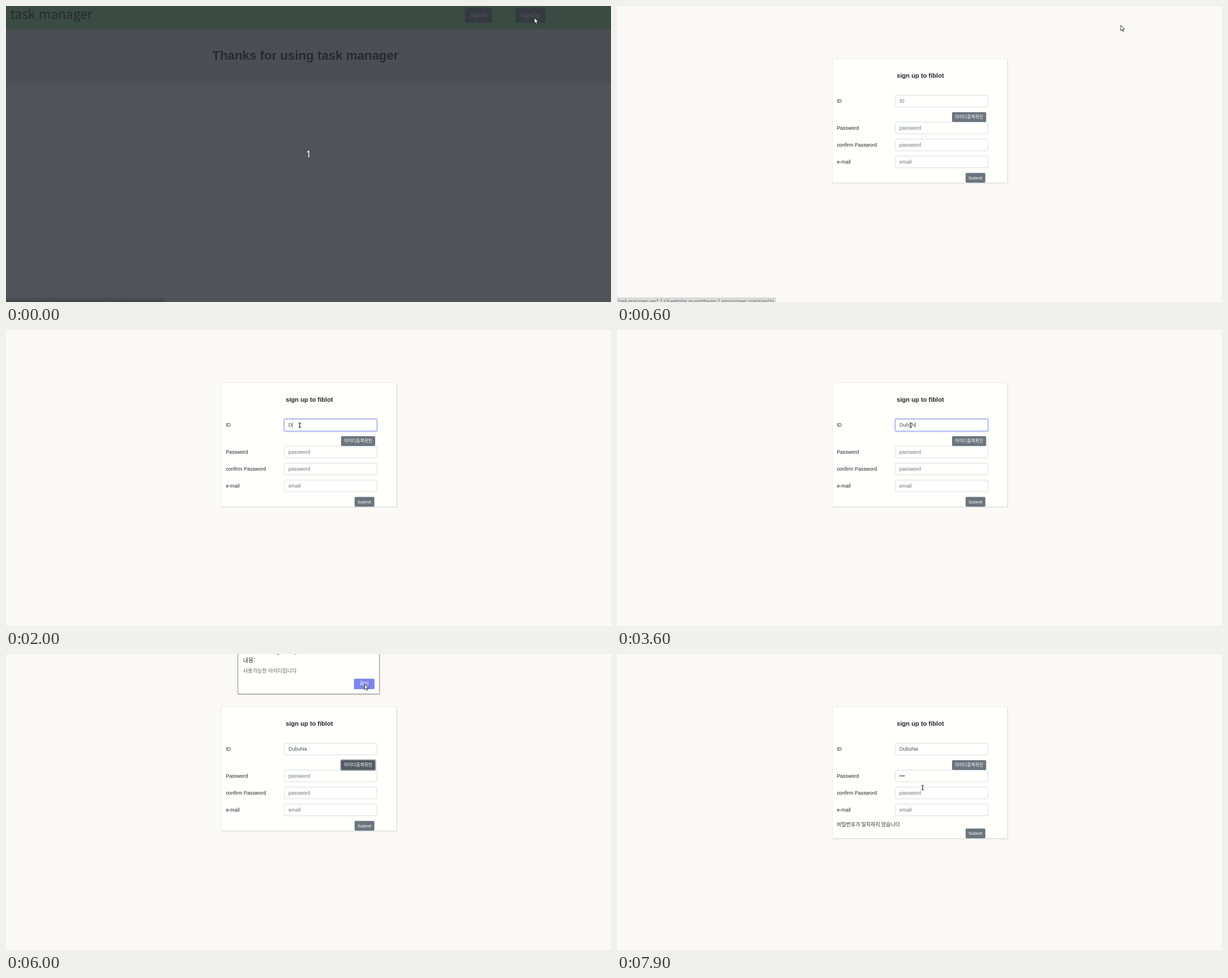
Animation of 1069 by 524 pixels, one loop 8 s. Source, as an HTML page:

```html
<!DOCTYPE html>
<html lang="ko">
<head>
<meta charset="utf-8">
<title>task manager</title>
<style>
html, body { margin: 0; width: 100%; height: 100%; overflow: hidden; background: #faf9f7; }
svg { display: block; font: 8.91px "Liberation Sans", "Noto Sans CJK KR", sans-serif; fill: #212529; }
.cjk { font-family: "Noto Sans CJK KR", "Noto Sans CJK", sans-serif; }
.noto { font-family: "Noto Sans", sans-serif; }
</style>
</head>
<body>
<svg id="stage" width="1069" height="524" viewBox="0 0 1069 524"></svg>
<script>
const stage = document.getElementById('stage');
const LOOP = 8000, STEP = 100;
const USER = 'DubuNa';
const GREY = '#6c757d', HOVER = '#5a6268', INK = '#495057';

// Pointer path: time, x, y
const PATH = [
  [0, 933.5, 21], [100, 932.5, 22], [300, 932.5, 22], [400, 931.5, 19.5], [500, 931.5, 19.5],
  [600, 890, 34], [700, 782.5, 64], [1100, 580, 138], [1200, 580, 138], [1300, 545, 164],
  [1500, 540, 166], [1600, 516, 169], [1700, 519, 168.5], [4000, 519, 168.5], [4400, 600, 161],
  [4700, 647.5, 187], [5300, 647.5, 187], [5400, 643, 163], [5500, 643, 163], [5800, 633.5, 53.5],
  [6000, 633.5, 53.5], [6200, 620, 120], [6300, 620, 120], [6500, 545, 216], [6700, 530, 284],
  [7700, 530, 284], [7900, 540, 236.5]
];
const INPUT_Y = [157.8, 205.3, 235.4, 265.5];

const clamp = v => Math.max(0, Math.min(1, v));
const within = (t, a, b) => t >= a && t < b;
// Rises at a and falls at b, each over a short transition
const fade = (t, a, b) => clamp((t - a + 50) / 150) * (1 - clamp((t - b + 50) / 150));

const rect = (x, y, w, h, fill, r = 0, more = '') =>
  `<rect x="${x}" y="${y}" width="${w}" height="${h}" rx="${r}" fill="${fill}" ${more}/>`;
const text = (x, y, s, size = 8.91, fill = '#212529', more = '') =>
  `<text x="${x}" y="${y}" font-size="${size}" fill="${fill}" ${more}>${s}</text>`;

function pointerAt(t) {
  const i = PATH.findLastIndex(p => p[0] <= t);
  const a = PATH[i], b = PATH[i + 1] || a;
  const k = b === a ? 0 : (t - a[0]) / (b[0] - a[0]);
  return [a[1] + (b[1] - a[1]) * k, a[2] + (b[2] - a[2]) * k];
}

function pointer(x, y, kind) {
  const shapes = {
    arrow: `<path d="M0 0V9.6L2.2 7.6L3.8 11L5.4 10.3L3.9 7H7Z" fill="#fff" stroke="#222" stroke-width=".9"/>`,
    hand: `<path d="M-1 6V.8a1 1 0 0 1 2 0V3.6L4.4 4.4Q5.4 4.7 5.2 6.2L4.5 10.4H0L-3.4 6.6Q-3.5 5.2 -2 5.6Z"
      fill="#fff" stroke="#222" stroke-width=".9"/>`,
    beam: ['#fff 2.4', '#222 1.2'].map(s => `<path d="M-2.2 -4Q0 -4 0 -3Q0 -4 2.2 -4M0 -3.5V3.5M-2.2 4Q0 4 0 3Q0 4 2.2 4"
      fill="none" stroke="${s.split(' ')[0]}" stroke-width="${s.split(' ')[1]}"/>`).join('')
  };
  return `<g transform="translate(${x} ${y})">${shapes[kind]}</g>`;
}

function home(hover) {
  return rect(0, 0, 1069, 42, '#86d18a') + rect(0, 42, 1069, 94.5, '#dfdfdb') +
    text(7.5, 23, 'task manager', 22.8, '#212529', 'class="cjk"') +
    text(364.6, 94.8, 'Thanks for using task manager', 22.27, '#212529', 'font-weight="700"') +
    rect(810.7, 3, 48.5, 26.7, GREY, 2.6) + text(820.2, 20.2, 'signIn', 11.14, '#fff') +
    rect(900, 3, 53.6, 26.7, hover ? HOVER : GREY, 2.6) + text(909.4, 20.2, 'signUp', 11.14, '#fff');
}

function status() {
  return rect(-3, 516.3, 284, 12, '#dadad8', 2.2, 'stroke="#cfcfcd" stroke-width=".5"') +
    text(2, 525.6, 'task-manager-ver1.1.s3-website.ap-northeast-2.amazonaws.com/signUp', 8.08, '#5c5f63', 'class="noto"');
}

function input(row, value, hint, glow) {
  const y = INPUT_Y[row];
  return rect(491.1, y - .8, 165, 22.7, 'none', 3, `stroke="#7b84ea" stroke-opacity="${glow * .42}" stroke-width="2"`) +
    rect(491.9, y + .2, 163.4, 20.7, '#fffffe', 2.2, 'stroke="#ced4da" stroke-width=".8"') +
    (glow ? rect(491.9, y + .2, 163.4, 20.7, 'none', 2.2, `stroke="#a5adee" stroke-opacity="${glow}" stroke-width=".8"`) : '') +
    text(499.1, y + 13.5, value || hint, 8.91, value ? INK : GREY);
}

function typed(t) {
  const n = [2000, 2600, 2600, 2700, 3600, 3900].filter(k => t >= k).length;
  return USER.slice(0, n);
}

function caret(t, id) {
  const on = within(t, 1400, 3300) || within(t, 3600, 4400);
  const widths = [0, 6.43, 11.4, 16.3, 21.3, 27.7, 32.7];
  return on ? rect(499.2 + widths[id.length], 163.2, .8, 9.6, INK) : '';
}

function form(t, hover) {
  const id = typed(t);
  const dots = '•'.repeat([6900, 7100, 7200].filter(k => t >= k).length);
  const grow = dots ? 13.4 : 0;
  const ring = fade(t, 4900, 6500);
  const check = within(t, 4900, 6200) ? '#545b62' : hover ? HOVER : GREY;
  const labels = ['ID', 'Password', 'confirm Password', 'e-mail'];
  return rect(380.5, 94, 310.6, 220.3 + grow, '#dbdbd9', 1) +
    rect(380.2, 93.2, 309.8, 219.8 + grow, '#fffffc', 0, 'stroke="#e2e2e0" stroke-width=".7"') +
    text(536, 127.2, 'sign up to fiblot', 11.14, '#212529', 'font-weight="700" text-anchor="middle"') +
    labels.map((s, i) => text(388.4, INPUT_Y[i] + 13.5, s)).join('') +
    input(0, id, 'ID', fade(t, 1400, 4900)) + caret(t, id) +
    input(1, dots, 'password', fade(t, 6500, 7500)) +
    (within(t, 6500, 7500) ? rect(499.2 + dots.length * 3.12, 210.7, .8, 9.6, INK) : '') +
    input(2, '', 'password', 0) + input(3, '', 'email', 0) +
    rect(591.2, 187.2, 62, 19, 'none', 2.4, `stroke="#6c757d" stroke-opacity="${ring * .55}" stroke-width="1.8"`) +
    rect(592, 188, 60.3, 17.3, check, 1.8) +
    text(597, 199.4, '아이디중복확인', 7.8, '#fff', 'class="cjk"') +
    (dots ? text(388.4, 305, '비밀번호가 일치하지 않습니다') : '') +
    rect(616, 295.5 + grow, 34.8, 17.3, GREY, 1.8) +
    text(620.9, 306.8 + grow, 'Submit', 7.8, '#fff');
}

function dialog(t) {
  return `<g class="cjk" opacity="${t < 5100 ? .7 : 1}">` +
    rect(409, -9, 251.6, 81.2, '#cfcfcd', 2.5) +
    rect(409.8, -10, 250, 80.8, '#fffffe', 2, 'stroke="#858585" stroke-width=".9"') +
    rect(478.5, 0, 3.6, .9, '#555') + rect(511, 0, 1.1, 1.4, '#555') +
    text(419, 15.3, '내용:', 10, '#333') +
    text(419, 32.8, '사용가능한 아이디입니다', 9.1, '#5f5f5f') +
    rect(614.8, 43.8, 36.3, 18.4, t >= 5800 ? '#7c85ea' : '#6b75e6', 2) +
    text(633, 56.1, '확인', 8.7, '#fff', 'text-anchor="middle"') + '</g>';
}

function draw(t) {
  const [x, y] = pointerAt(t);
  const onHome = t < 600, alert = within(t, 5000, 6100);
  const onCheck = !onHome && !alert && x > 592 && x < 652 && y > 186 && y < 205;
  const onInput = !onHome && x > 491 && x < 655 && INPUT_Y.some(top => y > top && y < top + 21);
  let kind = onInput && !alert ? 'beam' : 'arrow';
  if (onCheck || within(t, 100, 600) || within(t, 5000, 5400)) kind = 'hand';
  stage.innerHTML = rect(0, 0, 1069, 524, '#faf9f7') +
    (onHome ? home(t >= 100) : form(t, onCheck)) +
    (t < 1100 ? status() : '') +
    (alert ? dialog(t) : '') +
    (t < 100 ? rect(0, 0, 1069, 524, '#292d33', 0, 'opacity=".81"') +
      text(534.5, 268.2, '1', 17, '#fff', 'class="noto" text-anchor="middle"') : '') +
    pointer(x, y, kind);
}

let last = -1;
const start = performance.now();
function tick() {
  const t = Math.floor((performance.now() - start) % LOOP / STEP) * STEP;
  if (t !== last) draw(last = t);
  requestAnimationFrame(tick);
}
tick();
</script>
</body>
</html>
```
